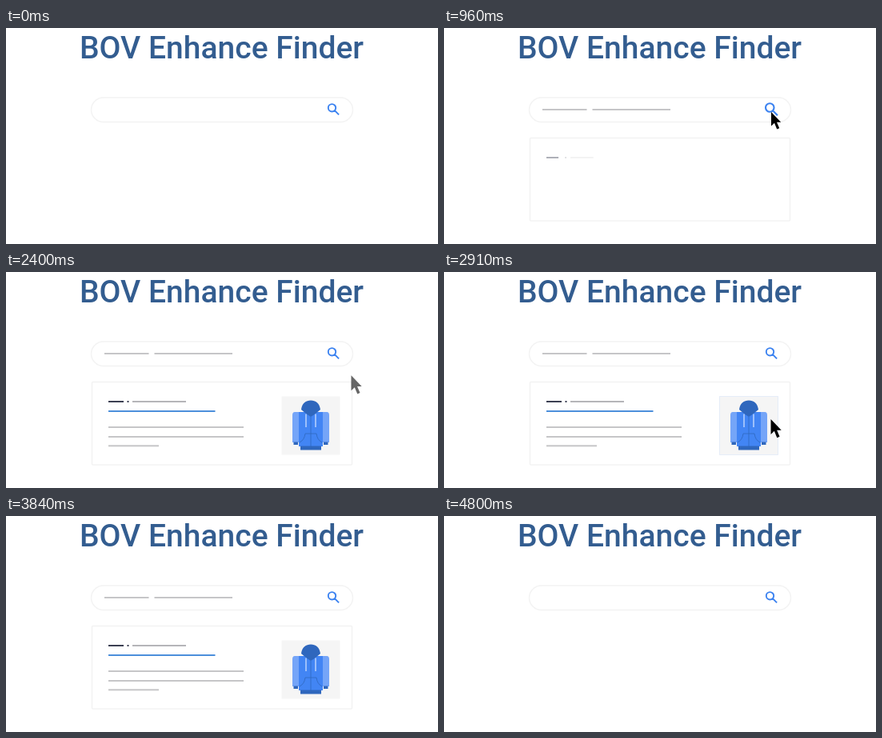
Recreate the animation shown at these times as an HTML page with a canvas. Size 540 by 270 pixels, loop 4830 ms.

```html
<!DOCTYPE html>
<html lang="en">
<head>
<meta charset="utf-8">
<title>Search animation</title>
<style>
  html, body { margin: 0; width: 100%; height: 100%; overflow: hidden; background: #fff; }
  canvas { display: block; width: 540px; height: 270px; }
</style>
</head>
<body>
<canvas id="stage" width="540" height="270"></canvas>
<script>
const ctx = document.getElementById('stage').getContext('2d');
const LOOP = 4830, STEP = 30;
const BLUE = '#4285f4', DARK = '#2f67bd', SLEEVE = '#75a5f8', GREY = '#c6c6c8';

const ramp = (t, start, end) => Math.min(1, Math.max(0, (t - start) / (end - start)));
const easeOut = p => 1 - (1 - p) ** 3;
const easeInOut = p => p < .5 ? 4 * p ** 3 : 1 - 4 * (1 - p) ** 3;
const mix = (a, b, p) => a + (b - a) * p;

// Runs draw() with an opacity and a scale around (x, y).
function layer(alpha, x, y, scale, draw) {
  if (alpha <= 0 || scale <= 0) return;
  ctx.save();
  ctx.globalAlpha = alpha;
  ctx.translate(x, y);
  ctx.scale(scale, scale);
  draw();
  ctx.restore();
}

function fill(d, color) {
  ctx.fillStyle = color;
  ctx.fill(new Path2D(d));
}

function stroke(d, color, width) {
  ctx.strokeStyle = color;
  ctx.lineWidth = width;
  ctx.stroke(new Path2D(d));
}

function outline(x, y, w, h, r, color, width) {
  ctx.beginPath();
  ctx.roundRect(x, y, w, h, r);
  ctx.strokeStyle = color;
  ctx.lineWidth = width;
  ctx.stroke();
}

// Each text bar: left, right, y, colour, start time.
const bars = [
  [123, 178.5, 102, GREY, 60],
  [185.5, 283, 102, GREY, 170],
  [128, 147, 162, '#3c4053', 796],
  [151.5, 153.5, 162, '#3c4053', 860],
  [158, 225, 162, '#b5b5b9', 892],
  [128, 261.5, 174, '#4c8fdb', 990],
  [128, 297, 194, GREY, 1120],
  [128, 297, 206, GREY, 1210],
  [128, 191, 217.3, GREY, 1290]
];

function bar(t, shown, [left, right, y, color, start]) {
  const p = ramp(t, start, start + 400);
  layer(p * shown, left, y, 1, () => {
    ctx.fillStyle = color;
    ctx.fillRect(0, -1, (right - left) * easeOut(p), 2);
  });
}

function magnifier() {
  stroke('M2.7 -2.2a4.7 4.7 0 1 1 -9.4 0a4.7 4.7 0 1 1 9.4 0M1.4 1.2L6.6 6.4', '#3b82f0', 1.9);
}

function hoodie() {
  fill('M-15 -17H-20Q-23 -17 -23 -13V21H-15ZM15 -17H20Q23 -17 23 -13V21H15Z', SLEEVE);
  fill('M-21.5 20.5H-16V24H-21.5ZM16 20.5H21.5V24H16Z', DARK);
  fill('M-15 -17H15V26H-15Z', BLUE);
  fill('M-13 25.5H13V30.5H-13Z', DARK);
  fill('M-12 -20C-11 -28 -6 -31.5 0 -31.5S11 -28 12 -20L9 -17.5Q5 -14 0 -11Q-5 -14 -9 -17.5Z', DARK);
  stroke('M0 -11V30M-14 21Q-8 18 -7 10H7Q8 18 14 21', DARK, .8);
  stroke('M-6 -14.5V2M6 -14.5V2', '#d8e6ff', 1.2);
}

const pointer = () => fill('M0 0V17.6L4 13.8L7.2 21.5L10.2 20.2L7 12.8H12.2Z', '#000');

function render(t) {
  const shown = 1 - ramp(t, 4500, 4800);
  ctx.fillStyle = '#fff';
  ctx.fillRect(0, 0, 540, 270);

  ctx.fillStyle = '#335d90';
  ctx.font = '500 39px Roboto, sans-serif';
  ctx.textAlign = 'center';
  ctx.fillText('BOV Enhance Finder', 269.5, 38);

  outline(106.5, 87, 327, 30.5, 15.25, '#f3f3f3', 1.5);
  layer(ramp(t, 700, 900) * shown, 0, 0, 1, () =>
    outline(107.5, 137.5, 325, 103.5, 1, '#f3f3f3', 1.5));

  const press = ramp(t, 840, 960) - ramp(t, 960, 1110);
  layer(1, 409.5, 102, 1 + .12 * press, magnifier);
  bars.forEach(b => bar(t, shown, b));

  layer(ramp(t, 1560, 1680) * shown, 381, 192, easeOut(ramp(t, 1560, 2060)), () =>
    fill('M-36.5 -36.5H36.5V36.5H-36.5Z', '#f5f5f5'));
  layer((ramp(t, 2840, 3080) - ramp(t, 3420, 3720)) * shown, 0, 0, 1, () =>
    outline(344.5, 155.5, 73, 73, 0, '#b3caf5', 1));
  layer(ramp(t, 1617, 1917) * shown, 381, 192, easeOut(ramp(t, 1617, 2117)), hoodie);

  const first = easeInOut(ramp(t, 60, 800));
  layer(ramp(t, 60, 200) - ramp(t, 1080, 1200),
    mix(505, 409, first), mix(236, 105, first), 1, pointer);
  const second = easeInOut(ramp(t, 2280, 2960));
  layer(ramp(t, 2280, 2480) - ramp(t, 3350, 3430),
    mix(432, 408.5, second), mix(128, 184, second), 1.08, pointer);
}

function frame(now) {
  render(Math.floor(now % LOOP / STEP) * STEP);
  requestAnimationFrame(frame);
}
requestAnimationFrame(frame);
</script>
</body>
</html>
```
